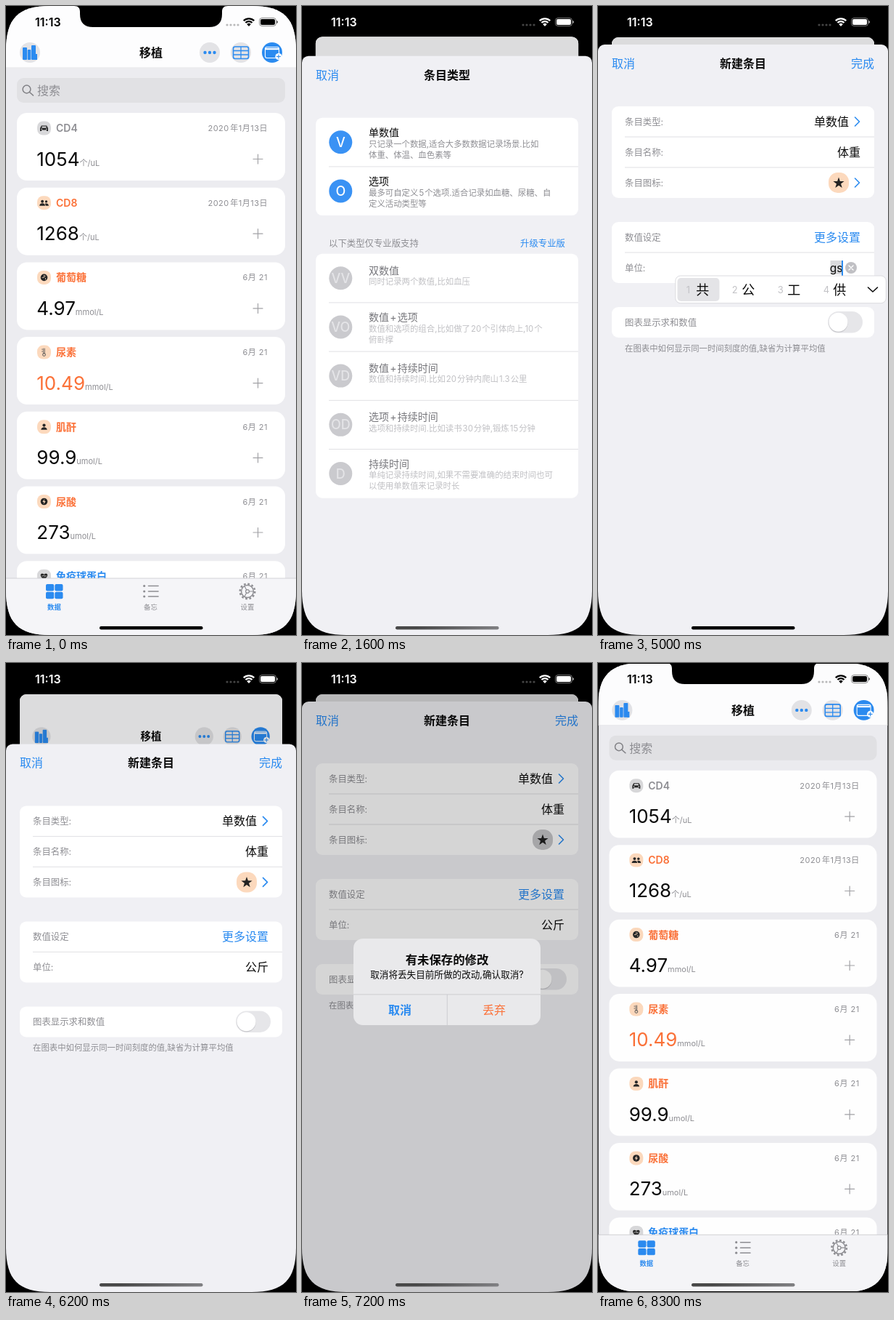
An HTML page that plays this animation: 400 px wide and 865 px high, repeating every 8.4 s.

```html
<!DOCTYPE html>
<html lang="zh-CN">
<head>
<meta charset="utf-8">
<style>
html, body { margin: 0; width: 100%; height: 100%; overflow: hidden; background: #000; }
svg { display: block; width: 400px; height: 865px; }
text { font-family: Inter, 'Noto Sans CJK SC', 'Noto Sans CJK', 'Noto Sans CJK JP', sans-serif; white-space: pre; }
</style>
</head>
<body>
<svg id="stage" viewBox="0 0 400 865" xmlns="http://www.w3.org/2000/svg"></svg>
<script>
const LOOP = 8400;
const BLUE = '#2b8bf0', ORANGE = '#fb7138', GRAY = '#8e8e93', PALE = '#c2c2c6', INK = '#0a0a0a';
const PAPER = '#f0f0f4', PEACH = '#fcd9bd', LINE = '#e0e0e4';

// Markup helpers
const rect = (x, y, w, h, fill, rx = 0, more = '') =>
  `<rect x="${x}" y="${y}" width="${w}" height="${h}" rx="${rx}" fill="${fill}" ${more}/>`;
const circle = (x, y, r, fill, more = '') => `<circle cx="${x}" cy="${y}" r="${r}" fill="${fill}" ${more}/>`;
const stroke = (d, color, w = 1, more = '') =>
  `<path d="${d}" fill="none" stroke="${color}" stroke-width="${w}" stroke-linecap="round" stroke-linejoin="round" ${more}/>`;
const shape = (d, fill) => `<path d="${d}" fill="${fill}"/>`;
const text = (s, x, y, size, fill, anchor = 'start', more = '') =>
  `<text x="${x}" y="${y}" font-size="${size}" fill="${fill}" text-anchor="${anchor}" ${more}>${s}</text>`;
const bold = 'font-weight="600"', medium = 'font-weight="500"';
const tight = s => s.replace(/ /g, '\u200a');
const divider = (x, y, w) => rect(x, y - 0.5, w, 1, LINE);
const chevron = y => stroke(`M354.5 ${y - 6}l6 6l-6 6`, BLUE, 1.6);

function star(x, y, r, fill) {
  const pts = Array.from({ length: 10 }, (_, i) => {
    const a = -Math.PI / 2 + i * Math.PI / 5, q = i % 2 ? r * 0.4 : r;
    return (x + q * Math.cos(a)).toFixed(2) + ' ' + (y + q * Math.sin(a)).toFixed(2);
  });
  return shape('M' + pts.join('L') + 'Z', fill);
}

// Small glyphs drawn around 0,0
const K = '#262626';
const glyphs = {
  car: shape('M-5.5 4v-4l1.8-3.5h7.4L5.5 0v4h-2v-1.5h-7V4z', K) + rect(-3, -2.4, 6, 2, '#d8d8da') +
    circle(-3.3, 1.2, 0.8, '#d8d8da') + circle(3.3, 1.2, 0.8, '#d8d8da'),
  people: circle(-2.4, -2, 2, K) + circle(3, -1.8, 1.7, K) +
    shape('M-6.3 4c0-4.5 7.8-4.5 7.8 0zM2.2 4c0-1.5-.6-2.4-1-2.8c2.2-1.2 5.2 0 5.2 2.8z', K),
  clock: circle(0, 0, 4.8, K) + stroke('M0-3V0H-2.6M1.5-2.5v1M2 1v1.5', PEACH, 0.8),
  thermo: stroke('M-.8-5v7M.8-5v7M-2-4h-1M-2-1h-1', '#555', 0.8) + circle(0, 3.4, 1.9, 'none', 'stroke="#555"'),
  person: circle(0, -2.2, 2.1, K) + shape('M-4.2 4c0-4.8 8.4-4.8 8.4 0z', K),
  bolt: circle(0, 0, 4.8, K) + shape('M.8-3.4L-2.2.6H-.2L-.8 3.4L2.2-.6H.2z', PEACH),
  heart: shape('M0 4.5C-8-.5-4.5-6 0-2.6C4.5-6 8-.5 0 4.5z', K) + stroke('M-3-.4h2l1-1.4l1 2.4l.6-1h1.6', '#d8d8da', 0.7)
};

const items = [
  ['car', 'CD4', '1054', '个/uL', '2020\u200a年1月13日', GRAY, INK],
  ['people', 'CD8', '1268', '个/uL', '2020\u200a年1月13日', ORANGE, INK],
  ['clock', '葡萄糖', '4.97', 'mmol/L', '6月 21', ORANGE, INK],
  ['thermo', '尿素', '10.49', 'mmol/L', '6月 21', ORANGE, ORANGE],
  ['person', '肌酐', '99.9', 'umol/L', '6月 21', ORANGE, INK],
  ['bolt', '尿酸', '273', 'umol/L', '6月 21', ORANGE, INK],
  ['heart', '免疫球蛋白', '12.6', 'g/L', '6月 21', BLUE, INK]
];

function itemCard([icon, name, value, unit, date, color, ink], i) {
  const y = 147 + i * 102.7;
  return rect(15, y, 370, 93, '#fff', 14) +
    rect(43, y + 11.5, 19, 19, color === ORANGE ? PEACH : '#d8d8da', 8) +
    `<g transform="translate(52.5 ${y + 21})">${glyphs[icon]}</g>` +
    text(name, 69, y + 26, 14, color, 'start', bold) +
    text(date, 361, y + 25, 11, GRAY, 'end', 'letter-spacing=".5"') +
    text(`${value}<tspan font-size="11" fill="${GRAY}">${unit}</tspan>`, 42.3, y + 72.5, 26, ink) +
    stroke(`M341 ${y + 63.5}h13m-6.5-6.5v13`, '#a2a2a6', 1.2);
}

function homePage() {
  const gearTeeth = circle(333, 805, 10.3, 'none', `stroke="${GRAY}" stroke-width="2.4" stroke-dasharray="2.7 2.7"`);
  return rect(0, 0, 400, 865, '#ececf0') +
    rect(15, 99, 370, 34, '#e1e1e4', 9) +
    circle(28.5, 114.5, 5.4, 'none', 'stroke="#808085" stroke-width="1.5"') +
    stroke('M32.5 118.5l5 4.5', '#808085', 1.6) + text('搜索', 43, 122, 16, GRAY) +
    items.map(itemCard).join('') +
    rect(0, 0, 400, 85, '#fdfdfe') + rect(0, 84.5, 400, 0.7, '#e4e4e7') +
    text('移植', 200, 70, 16, INK, 'middle', bold) +
    [33, 281, 324].map(x => circle(x, 64, 14, '#e3e3e6')).join('') +
    rect(23, 57, 6, 17, BLUE, 1) + rect(29.7, 60, 4.6, 14, BLUE, 1) + rect(35, 54, 6, 20, BLUE, 1) + rect(40, 66, 3, 8, BLUE) +
    [274.5, 281, 287.5].map(x => circle(x, 64, 2.2, BLUE)).join('') +
    rect(313.5, 56, 21, 16.5, 'none', 2.5, `stroke="${BLUE}" stroke-width="1.6"`) +
    stroke('M314 61.5h20M314 67h20M324 56.5v15.5', BLUE, 1.3) +
    `<g id="addButton">${circle(367, 64, 14, BLUE)}${rect(357.5, 56.5, 19, 15, 'none', 2.5, 'stroke="#fff" stroke-width="1.1"')}
      ${rect(358, 58, 18, 2.2, '#fff')}${circle(376, 69.5, 4.6, '#fff')}${stroke('M373.5 69.5h5m-2.5-2.5v5', BLUE, 1.1)}</g>` +
    rect(0, 787, 400, 78, '#f5f5f8') + rect(0, 786.6, 400, 0.8, '#c9c9cd') +
    [[55, 795], [67.3, 795], [55, 805.7], [67.3, 805.7]].map(([x, y]) => rect(x, y, 11.2, 9.5, BLUE, 2)).join('') +
    [797.5, 805, 812].map(y => stroke(`M196.5 ${y}h13.5`, GRAY, 1.6) + circle(190.7, y, 1.6, GRAY)).join('') +
    gearTeeth + circle(333, 805, 8.4, 'none', `stroke="${GRAY}" stroke-width="1.5"`) +
    circle(333, 805, 2.4, 'none', `stroke="${GRAY}" stroke-width="1.2"`) +
    stroke('M335.4 805h5.5M331.8 807l-2.8 5M331.8 803l-2.8-5', GRAY, 1.2) +
    [['数据', 66.5, BLUE], ['备忘', 199.5, GRAY], ['设置', 333, GRAY]]
      .map(([s, x, c]) => text(s, x, 829.5, 9.4, c, 'middle', c === BLUE ? bold : '')).join('');
}

const sheetBase = title => rect(0, 53, 400, 900, PAPER, 9) +
  text('取消', 19, 85, 16, BLUE) + text(title, 200, 85, 16, INK, 'middle', bold);

const freeTypes = [
  ['V', '单数值', '只记录一个数据,适合大多数数据记录场景.比如', '体重、体温、血色素等'],
  ['O', '选项', '最多可自定义 5 个选项.适合记录如血糖、尿糖、自', '定义活动类型等']
];
const proTypes = [
  ['VV', '双数值', '同时记录两个数值,比如血压'],
  ['VO', '数值 + 选项', '数值和选项的组合,比如做了 20 个引体向上,10 个', '俯卧撑'],
  ['VD', '数值 + 持续时间', '数值和持续时间.比如 20 分钟内爬山 1.3 公里'],
  ['OD', '选项 + 持续时间', '选项和持续时间.比如读书 30 分钟,锻炼 15 分钟'],
  ['D', '持续时间', '单纯记录持续时间,如果不需要准确的结束时间也可', '以使用单数值来记录时长']
];

function typeRows(rows, top, on) {
  return rect(19, top, 362, rows.length * 67.2, '#fff', 9) + (on ? rect(19, top, 362, 67, '#d9d9dd', 9, 'id="tapRow" opacity="0"') : '') +
    rows.map(([mark, name, a, b], i) => {
      const y = top + i * 67.2, base = y + (b ? 25.5 : 28);
      const sub = on ? GRAY : '#c0c0c4';
      return (i ? divider(37, y, 344) : '') + circle(53.3, y + 33.5, 16, on ? '#3a92f4' : '#cacace') +
        text(mark, 53.3, y + 40, 18, on ? '#fff' : '#e4e4e7', 'middle', medium) +
        text(tight(name), 92, base, 14, on ? INK : '#77777c') +
        text(tight(a), 92, base + 14.3, 11.4, sub) + (b ? text(b, 92, base + 29.3, 11.4, sub) : '');
    }).join('');
}

const typeSheet = () => sheetBase('条目类型') + typeRows(freeTypes, 138, true) +
  text('以下类型仅专业版支持', 37, 315.5, 12.4, GRAY) + text('升级专业版', 363, 315.5, 12.4, BLUE, 'end') +
  typeRows(proTypes, 325, false);

function entrySheet() {
  const label = (s, y) => text(s, 37, y + 4.5, 12.4, GRAY);
  return sheetBase('新建条目') + text('完成', 381, 85, 16, PALE, 'end', 'id="done"') +
    rect(19, 138, 362, 126, '#fff', 9) + divider(37, 180, 344) + divider(37, 222, 344) +
    label('条目类型:', 159) + label('条目名称:', 201) + label('条目图标:', 243) +
    text('单数值', 346, 165, 16, INK, 'end') + chevron(159) +
    rect(318, 229, 28, 28, PEACH, 12.5, 'id="iconBg"') + star(332, 243.5, 8, '#222') + chevron(243) +
    rect(19, 297, 362, 84, '#fff', 9) + divider(37, 339, 344) +
    label('数值设定', 318) + text('更多设置', 362, 324, 16, BLUE, 'end') + label('单位:', 360) +
    rect(19, 414, 362, 42, '#fff', 9) + label('图表显示求和数值', 435) +
    rect(317, 420, 48, 29.5, '#e6e6e9', 14.7) + circle(331.5, 435.8, 13.2, '#c9c9cd') + circle(331.5, 434.8, 13, '#fff') +
    text('在图表中如何显示同一时间刻度的值,缺省为计算平均值', 37, 474.5, 11.4, GRAY) +
    '<g id="nameField"></g><g id="unitField"></g>';
}

const alertBox = () => rect(71, 379, 258, 119, '#e9e9eb', 13) +
  text('有未保存的修改', 200, 413.5, 16.4, INK, 'middle', bold) +
  text('取消将丢失目前所做的改动,确认取消?', 200, 432.5, 12.6, INK, 'middle') +
  rect(71, 455.5, 258, 0.8, '#c6c6ca') + rect(199.8, 456, 0.8, 42, '#c6c6ca') +
  text('取消', 135, 483, 16, BLUE, 'middle', bold) + text('丢弃', 265, 483, 16, ORANGE, 'middle');

function statusBar() {
  const arc = r => stroke(`M${335 - r * 0.7} ${27.5 - r * 0.7}A${r} ${r} 0 0 1 ${335 + r * 0.7} ${27.5 - r * 0.7}`, 'currentColor', 2.3, 'style="stroke-linecap:butt"');
  return text('11:13', 40, 28, 16, 'currentColor', 'start', bold) +
    [305, 310, 315, 320].map(x => circle(x, 26, 1.6, 'currentColor', 'opacity=".27"')).join('') +
    arc(10.3) + arc(6.5) + shape('M335 28l-2.8-3a4 4 0 0 1 5.6 0z', 'currentColor') +
    rect(349.5, 16.5, 23, 11, 'none', 3.5, 'stroke="currentColor" opacity=".45"') +
    rect(351, 18, 20, 8, 'currentColor', 2) + shape('M373.6 20v4c1.6-.6 1.6-3.4 0-4z', 'currentColor');
}

// Device outline with smooth corners
function corners() {
  const r = 61, k = 17;
  return `M0 ${r}C0 ${k} ${k} 0 ${r} 0H${400 - r}C${400 - k} 0 400 ${k} 400 ${r}V${865 - r}` +
    `C400 ${865 - k} ${400 - k} 865 ${400 - r} 865H${r}C${k} 865 0 ${865 - k} 0 ${865 - r}Z`;
}

const stage = document.getElementById('stage');
stage.innerHTML = `<defs>
  <clipPath id="screen"><path d="${corners()}"/></clipPath>
  <clipPath id="homeClip"><rect id="homeEdge" width="400" height="865"/></clipPath>
  <linearGradient id="fade"><stop offset=".2" stop-color="#484848"/><stop offset="1" stop-color="#808083"/></linearGradient>
  </defs>` + rect(0, 0, 400, 865, '#000') + `<g clip-path="url(#screen)">
  <g id="home"><g clip-path="url(#homeClip)">${homePage()}${rect(0, 0, 400, 865, '#000', 0, 'id="homeDim"')}</g></g>
  <g id="types">${typeSheet()}</g>
  <g id="entry">${entrySheet()}</g>
  ${rect(0, 0, 400, 865, '#000', 0, 'id="alertDim"')}
  <g id="alert">${alertBox()}</g>
  ${shape('M94 0C100 0 102 3 102 8V11C102 23 108 29 120 29H280C292 29 298 23 298 11V8C298 3 300 0 306 0Z', '#000')}
  <g id="status">${statusBar()}</g>
  ${rect(129, 853, 142.5, 4.4, '#000', 2.2, 'id="homeBar"')}</g>`;

const el = {};
stage.querySelectorAll('[id]').forEach(n => el[n.id] = n);
const set = (id, name, v) => el[id].setAttribute(name, v);

// Motion
const clamp = x => Math.max(0, Math.min(1, x));
const ramp = (t, a, b) => clamp((t - a) / (b - a));
const within = (t, a, b) => t >= a && t < b;
function spring(t, start) {
  if (t <= start) return 0;
  const x = (t - start) * 0.016, s = 1 - (1 + x) * Math.exp(-x);
  return s > 0.997 ? 1 : s;
}

// time, text, focused, caret visible, candidates
const nameSteps = [
  [0, '', 0], [3300, '', 1, 1], [3500, 't', 1, 1, '他 她 它 图'], [3600, 'ti', 1, 1, '体 题 提 替'],
  [3800, 'ti zh', 1, 1, '体重 体制 体质 提着'], [4000, 'ti zhong', 1, 1, '体重 提中 替种 题中'],
  [4200, '体重', 1, 1], [4400, '体重', 1, 0], [4600, '体重', 0]
];
const unitSteps = [
  [0, '', 0], [4600, '', 1, 1], [4800, 'g', 1, 1, '个 给 共 公'], [5000, 'gs', 1, 1, '共 公 工 供'],
  [5100, 'gong', 1, 1, '共 公 工 供'], [5200, 'gong jin', 1, 1, '公斤 公金 工斤 共进'], [5300, '公斤', 1, 1], [5500, '公斤', 0]
];

function popup(y, words) {
  const slot = w => 45 + 18 * w.length;
  const width = words.reduce((sum, w) => sum + slot(w), 38.5);
  let x = 397.3 - width;
  let out = rect(x, y + 11, width, 37.7, '#fff', 7, 'stroke="#d4d4d8" stroke-width=".8"') +
    rect(x + 2.7, y + 14, slot(words[0]) - 5, 32, '#e4e4e7', 5);
  words.forEach((w, i) => {
    out += text(i + 1, x + 15, y + 35, 13, PALE) + text(w, x + 28.5, y + 36.5, 18, INK);
    x += slot(w);
  });
  return out + stroke(`M372.5 ${y + 27}l6.5 6l6.5-6`, INK, 1.6);
}

function field(y, hint, [, value, focus, caret, cands]) {
  const edge = focus && value ? 337.5 : 362;
  let out = '';
  if (cands) {
    const w = value.length * 8.5;
    out += rect(edge - w, y - 10, w, 19, '#dadadd');
  }
  out += text(value || hint, edge, y + 6, cands ? 15.5 : 16, value ? INK : PALE, 'end');
  if (focus && value) {
    out += circle(349, y, 8, '#c0c0c4') + stroke(`M346 ${y - 3}l6 6m0-6l-6 6`, '#fff', 1.4);
  }
  if (caret) out += rect(edge - 1.5, y - 10, 2, 21, BLUE);
  return out + (cands ? popup(y, cands.split(' ')) : '');
}

const shown = {};
function drawField(id, y, hint, steps, t) {
  const step = steps.filter(s => s[0] <= t).pop();
  if (shown[id] === step) return;
  shown[id] = step;
  el[id].innerHTML = field(y, hint, step);
}

function render(t) {
  const first = spring(t, 1234), second = spring(t, 2560), leave = spring(t, 7950);
  const back = first * (1 - leave), scale = 1 - 0.095 * back;

  set('home', 'transform', `translate(${200 * (1 - scale)} ${43 * back}) scale(${scale})`);
  set('homeEdge', 'rx', 40 - 30 * back);
  set('homeDim', 'opacity', 0.13 * back);
  set('addButton', 'opacity', within(t, 1100, 1250) ? 0.4 : 1);

  // The entry sheet covers the type sheet and takes its place
  set('types', 'transform', `translate(0 ${812 * (1 - first)})`);
  set('types', 'display', first > 0 && second < 1 ? 'inline' : 'none');
  set('tapRow', 'opacity', within(t, 2560, 2900) ? 1 : 0);

  // Pull down, then rebound while the alert opens
  const pull = ramp(t, 5750, 6250), eased = pull * pull * (3 - 2 * pull);
  const drag = 60 * eased * (1 - spring(t, 6405));
  set('entry', 'transform', `translate(0 ${812 * (1 - second) + drag + 880 * leave})`);
  set('entry', 'display', second > 0 ? 'inline' : 'none');
  set('done', 'fill', t >= 3500 ? BLUE : PALE);
  set('iconBg', 'fill', within(t, 6400, 7400) ? '#c6c6c9' : PEACH);
  drawField('nameField', 201, '请输入条目名称', nameSteps, t);
  drawField('unitField', 360, 'ml,米等等,可以为空', unitSteps, t);

  const open = ramp(t, 6380, 6580), close = ramp(t, 7300, 7550);
  const grow = 1 + 0.15 * (1 - open) ** 2;
  set('alertDim', 'opacity', 0.165 * open * (1 - close));
  set('alert', 'opacity', open * (1 - close));
  set('alert', 'transform', `translate(${200 * (1 - grow)} ${438.5 * (1 - grow)}) scale(${grow})`);

  const shade = Math.round(255 * ramp(back, 0.3, 0.7));
  set('status', 'color', `rgb(${shade},${shade},${shade})`);
  const moving = within(t, 1200, 1800) || within(t, 2600, 3200) || within(t, 5800, 7500) || t >= 8000;
  set('homeBar', 'fill', moving ? 'url(#fade)' : '#000');
}

const begin = performance.now();
function tick() {
  render((performance.now() - begin) % LOOP);
  requestAnimationFrame(tick);
}
tick();
</script>
</body>
</html>
```
